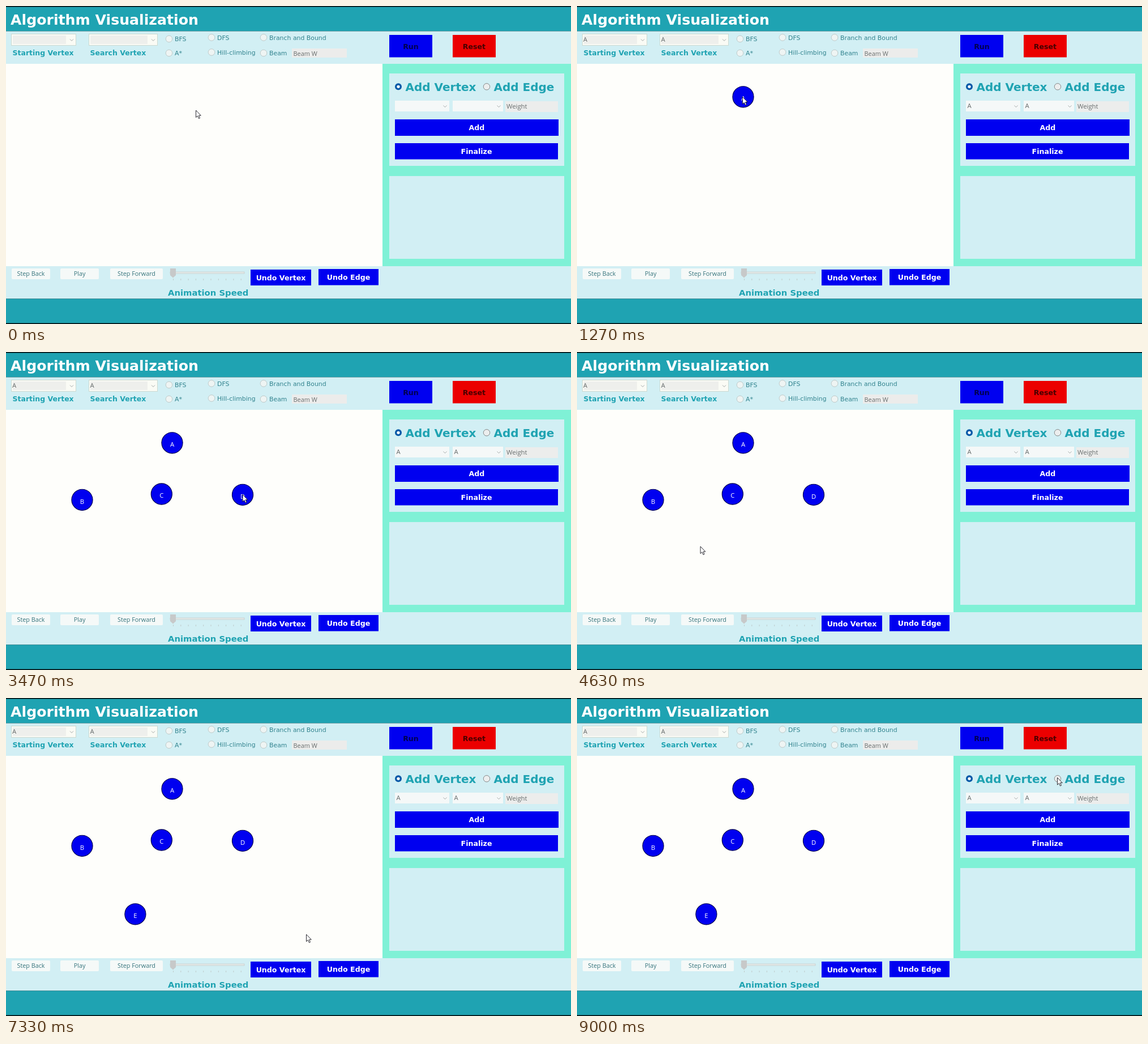
An HTML page for the animation above (9030 ms loop, 998 by 561 pixels).

```html
<!DOCTYPE html>
<html lang="en">
<head>
<meta charset="utf-8">
<title>Algorithm Visualization</title>
<style>
  html, body { margin: 0; width: 100%; height: 100%; overflow: hidden; background: #000; }
  svg { display: block; }
  text { font-family: "Open Sans", "Noto Sans", sans-serif; white-space: pre; }
  .bold { font-family: "DejaVu Sans", sans-serif; font-weight: bold; }
  .wide { font-family: "DejaVu Sans", sans-serif; }
  .mid { text-anchor: middle; }
</style>
</head>
<body>
<svg id="stage" width="998" height="561" viewBox="0 0 998 561"></svg>
<script>
const LOOP = 9030;
const TEAL = '#1fa3b2', PALE = '#d2eff4', MINT = '#7ff1d6', BLUE = '#0000f0', GREY = '#686d6d';
const stage = document.getElementById('stage');

function add(tag, attrs, content) {
  const node = document.createElementNS('http://www.w3.org/2000/svg', tag);
  for (const key in attrs) node.setAttribute(key, attrs[key]);
  if (content) node.textContent = content;
  return stage.appendChild(node);
}
const rect = (x, y, right, bottom, fill, more) =>
  add('rect', { x, y, width: right - x, height: bottom - y, fill, ...more });
const label = (content, x, y, size, fill, style = '') =>
  add('text', { x, y, 'font-size': size, fill, class: style }, content);

function button(content, x, y, right, bottom, fill = BLUE, ink = '#fff') {
  rect(x, y, right, bottom, fill);
  label(content, (x + right) / 2, (y + bottom) / 2 + 4.8, 12.6, ink, 'bold mid');
}
function softButton(content, x, right) {
  rect(x, 463, right, 482, '#f5f9f8', { rx: 2 });
  label(content, (x + right) / 2, 476.3, 10.8, '#37757d', 'mid');
}
function radio(content, x, y) {
  add('circle', { cx: x, cy: y, r: 5.8, fill: '#eef4f3', stroke: '#c0cbca' });
  label(content, x + 10, y + 4, 10.9, '#31838e', 'wide');
}
function chevron(x, y) {
  add('path', { d: `M${x - 3} ${y - 1.5}l3 3 3-3`, fill: 'none', stroke: '#a3a9a8' });
}

// Window background
rect(0, 1.5, 998, 44.5, TEAL);
rect(0, 44.5, 998, 102, PALE);
rect(0, 102, 665, 459, '#fefefb');
rect(665, 102, 998, 459, MINT);
rect(0, 459, 998, 516.5, PALE);
rect(0, 516.5, 998, 559.5, TEAL);
label('Algorithm Visualization', 8, 33, 25.2, '#fff', 'bold');

// Toolbar
for (const [x, right] of [[9, 124], [146, 268]]) {
  rect(x + .5, 49.5, right - .5, 69.5, '#fafbf5', { stroke: '#cbd9d1' });
  rect(x + 3, 52, right - 18, 67, '#eeefec');
  chevron(right - 8, 60);
}
label('Starting Vertex', 11.5, 87, 12.5, TEAL, 'bold');
label('Search Vertex', 148.5, 87, 12.5, TEAL, 'bold');
radio('BFS', 288, 58);
radio('A*', 288, 83);
radio('DFS', 363, 55.5);
radio('Hill-climbing', 363, 81.5);
radio('Branch and Bound', 455, 55.5);
radio('Beam', 455, 83);
rect(505, 75, 602, 91, '#ececeb');
label('Beam W', 507.5, 88, 10.9, GREY);
button('Run', 677, 51, 753, 90.5, BLUE, '#000050');
button('Reset', 789, 51, 865, 90.5, '#eb0000', '#480000');

// Side panels
rect(677, 119, 986, 282, PALE);
rect(677, 300, 986, 446, PALE);
add('circle', { cx: 693, cy: 142.3, r: 6, fill: '#0759a8' });
add('circle', { cx: 693, cy: 142.3, r: 2.6, fill: '#fff' });
label('Add Vertex', 705.5, 150, 20, TEAL, 'bold');
add('circle', { cx: 849, cy: 142.3, r: 5.7, fill: '#eceeee', stroke: '#858989' });
label('Add Edge', 861.5, 150, 20, TEAL, 'bold');
rect(687, 167, 783, 186, '#f5f8f8');
chevron(775.5, 177);
rect(789, 167, 878, 186, '#f5f8f8');
chevron(870.5, 177);
rect(882, 168, 975, 187, '#ecedec');
label('Weight', 884, 181, 11.3, GREY);
button('Add', 687, 200, 976, 229);
button('Finalize', 687, 242, 975, 270.5);

// Playback controls
softButton('Step Back', 10, 78);
softButton('Play', 96, 164);
softButton('Step Forward', 184, 277);
rect(290, 469, 421, 472, '#e4e9e8', { stroke: '#c5cccb', 'stroke-width': .8 });
for (let i = 0; i < 10; i++) {
  const x = 295 + i * 13.3;
  rect(x, 481, x + 1, 484, '#bfcbca');
}
add('path', { d: 'M290 463h10v12l-5 4.5-5-4.5z', fill: '#c7c9c9' });
label('Animation Speed', 286, 511, 14.8, TEAL, 'bold');
button('Undo Vertex', 432, 465, 539, 493);
button('Undo Edge', 552, 464, 658, 492.5);

// Vertices: name, centre, moment of the click
const vertices = [
  ['A', 293.5, 160.3, 1050], ['B', 134.5, 260.8, 1980], ['C', 274.8, 250.5, 2760],
  ['D', 418, 251.8, 3430], ['E', 228.4, 381.3, 5050]
].map(([name, x, y, time]) => ({
  time,
  nodes: [
    add('circle', { cx: x, cy: y, r: 18.6, fill: BLUE, stroke: '#000048', 'stroke-width': 1.1 }),
    label(name, x, y + 6.8, 11.3, '#fff', 'mid')
  ]
}));
const choices = [[11, 63.3], [148.5, 63.3], [689.5, 180.3], [791.5, 180.3]]
  .map(([x, y]) => label('A', x, y, 11.3, GREY));

const cursor = add('path', {
  d: 'M0 0V12.6L2.9 9.9 5 14.6 7 13.7 5 9.2H8.8Z',
  fill: '#fff', stroke: '#15151c', 'stroke-width': .9, 'stroke-linejoin': 'round'
});

// Pointer stops: time, x, y
const stops = [
  [0, 335.5, 184], [150, 335.5, 184], [700, 269.5, 162], [950, 293, 160], [1250, 293, 160],
  [1850, 134.5, 260.5], [2150, 134.5, 260.5], [2650, 275, 250], [2900, 275, 250],
  [3350, 418, 251.5], [3650, 418, 251.5], [4630, 218, 343], [4950, 228, 381],
  [5500, 228, 381], [7330, 530.5, 417], [7500, 530.5, 417], [8800, 848.5, 140.5], [LOOP, 848.5, 140.5]
];

function pointer(t) {
  const next = Math.max(1, stops.findIndex(stop => stop[0] > t));
  const [t0, x0, y0] = stops[next - 1], [t1, x1, y1] = stops[next];
  const k = (t - t0) / (t1 - t0), ease = k * k * (3 - 2 * k);
  return [x0 + (x1 - x0) * ease, y0 + (y1 - y0) * ease];
}
const show = (node, on) => node.setAttribute('visibility', on ? 'visible' : 'hidden');

function render(t) {
  for (const { time, nodes } of vertices) nodes.forEach(node => show(node, t >= time));
  choices.forEach(node => show(node, t >= vertices[0].time));
  cursor.setAttribute('transform', `translate(${pointer(t)})`);
}

const start = performance.now();
function tick() {
  render((performance.now() - start) % LOOP);
  requestAnimationFrame(tick);
}
tick();
</script>
</body>
</html>
```
